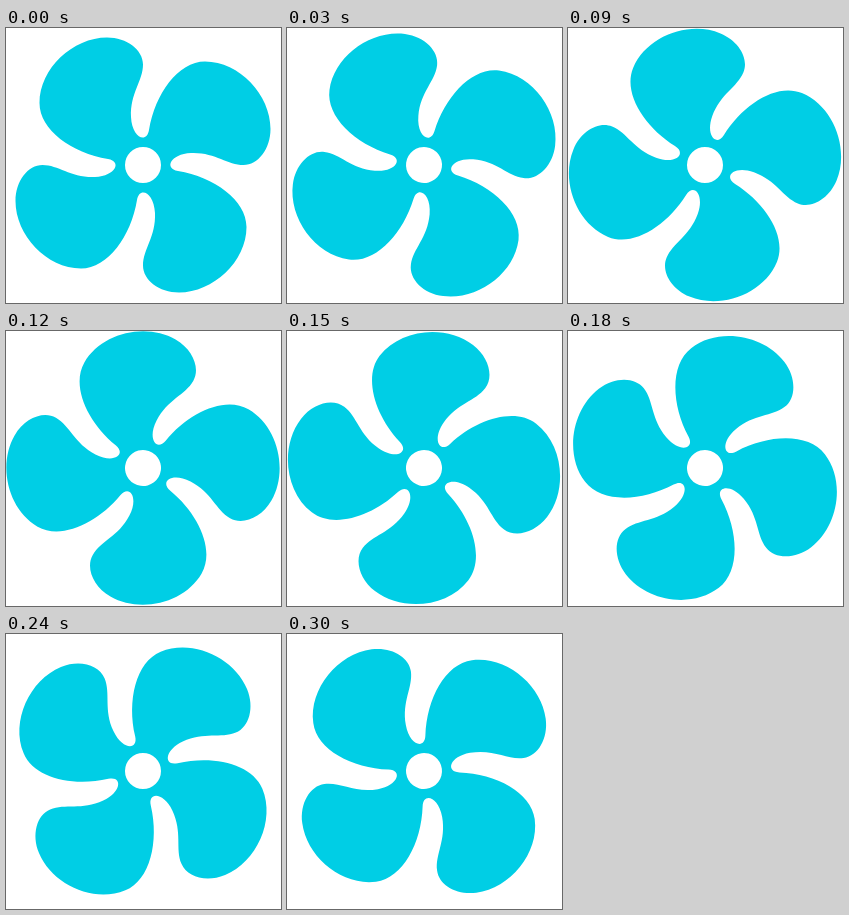
Animation, 275 px wide and 275 px high, one loop 0.33 s. Source, as an HTML page with a canvas:

```html
<!DOCTYPE html>
<html lang="en">
<head>
<meta charset="utf-8">
<title>Spinning fan</title>
<style>
  html, body { margin: 0; width: 100%; height: 100%; overflow: hidden; background: #fff; }
  canvas { display: block; }
</style>
</head>
<body>
<canvas id="stage" width="275" height="275"></canvas>
<script>
const stage = document.getElementById('stage');
const ctx = stage.getContext('2d');
const CENTER = 137;
const HUB_RADIUS = 18;
const BLADES = 4;
const STEP_MS = 30;
const STEP_COUNT = 11;
const STEP_DEGREES = 7.5;
const SKIP_FROM = 6; // the turn jumps a double step here

// Continues the outline by one blade, ending where the next one starts.
function addBlade() {
  ctx.bezierCurveTo(12, -71, 35, -103.5, 62, -103.5);       // leading edge
  ctx.bezierCurveTo(96.5, -103.5, 127.5, -70, 127.5, -36);  // outer rim
  ctx.bezierCurveTo(127.5, -16, 115, 0, 100.5, 0);          // rounded corner
  ctx.bezierCurveTo(84, 0, 72, -13, 48, -12);               // hollow edge
  ctx.bezierCurveTo(27, -11, 21, 3.7, 35, 6);               // slot end
}

function drawFan(degrees) {
  ctx.setTransform(1, 0, 0, 1, 0, 0);
  ctx.clearRect(0, 0, stage.width, stage.height);
  ctx.translate(CENTER, CENTER);
  ctx.rotate(degrees * Math.PI / 180);

  ctx.beginPath();
  ctx.moveTo(6, -35);
  for (let i = 0; i < BLADES; i++) {
    addBlade();
    ctx.rotate(2 * Math.PI / BLADES);
  }
  ctx.closePath();
  ctx.moveTo(HUB_RADIUS, 0);
  ctx.arc(0, 0, HUB_RADIUS, 0, 2 * Math.PI);
  ctx.fillStyle = '#00cee5';
  ctx.fill('evenodd');
}

function render() {
  const step = Math.floor(performance.now() / STEP_MS) % STEP_COUNT;
  drawFan((step + (step >= SKIP_FROM ? 1 : 0)) * STEP_DEGREES);
  requestAnimationFrame(render);
}
render();
</script>
</body>
</html>
```
